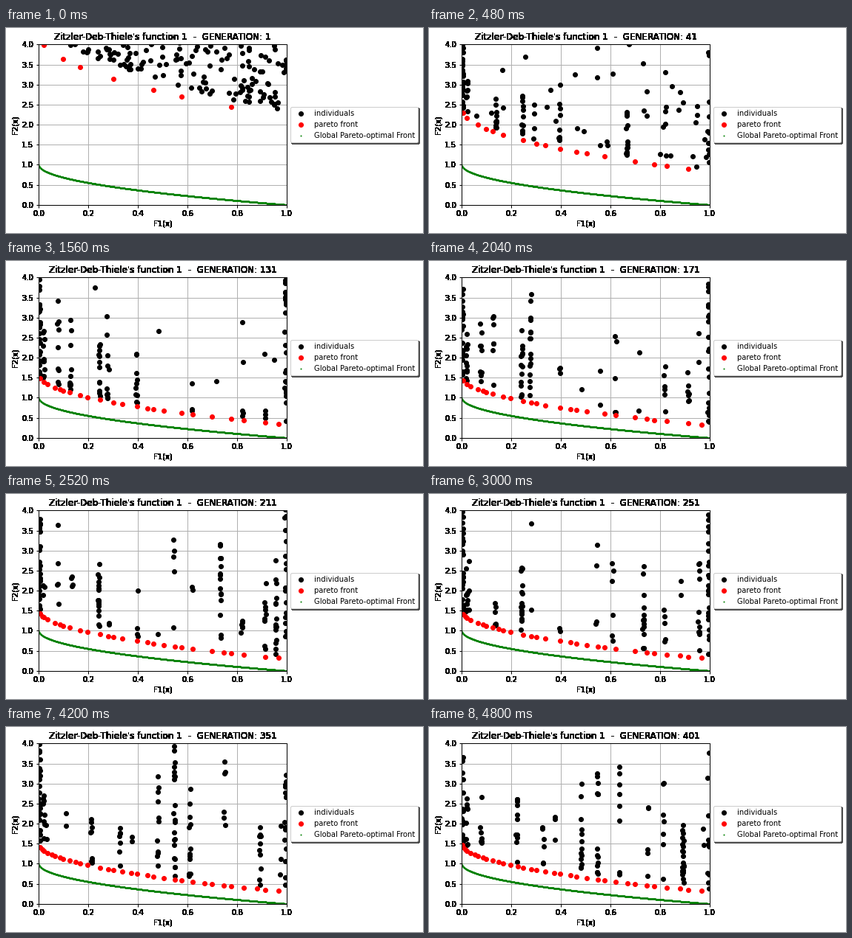
A matplotlib script that plays this animation: 563 px wide and 278 px high, repeating every 4920 ms.

```python
import numpy as np
import matplotlib.pyplot as plt
from matplotlib.animation import FuncAnimation

W, H, DPI = 563, 278, 72
FRAMES, INTERVAL, GEN_STEP = 41, 120, 10
SIZE = 135          # dominated individuals
SLOTS = 12          # places where a gene cluster may settle
LIFE = 12           # frames a cluster lasts


def front(x, age):
    """Best known F2 at x: falls quickly, then settles."""
    top = 1.5 + 2.8 * np.exp(-age / 35)
    drop = 1.2 + .9 * np.exp(-age / 45)
    return top - drop * np.sqrt(x)


def elite(age):
    """Evenly scattered front members, more of them with age."""
    count = round(7 + 27 * (age / 400) ** .45)
    x = (np.arange(1, count + 1) * .618034 % 1) ** 1.6
    return x, front(x, age)


def clusters(i):
    """Columns of equal x: place, weight and reach upwards."""
    cols = [(.003, 22, 1), (.02, 8, .5), (.995, 16, 1)]
    for j in range(SLOTS):
        rng = np.random.default_rng([j, (i + 5 * j) // LIFE])
        u, v, w = rng.random(3)
        cols.append(((j + .3 + .7 * u) / SLOTS, 1 + 16 * v ** 2, .3 + .7 * w))
    return np.array(cols).T


def individuals(i, age):
    """A loose cloud that gathers into columns."""
    rng = np.random.default_rng(i + 7)
    place, weight, reach = clusters(i)
    pick = rng.choice(len(place), SIZE, p=weight / weight.sum())
    loose = rng.random(SIZE) < np.exp(-age / 30)
    x = np.where(loose, rng.random(SIZE) ** .6,
                 place[pick] + rng.uniform(-.003, .003, SIZE))
    low = front(x, age) + .08 + loose * .4 * (1 - x)
    span = (4.05 - low) * np.where(loose, 1, reach[pick])
    return x, low + span * rng.random(SIZE) ** 1.2


def harden(img, dpi):
    """Solid edges without antialiasing."""
    out = img.copy()
    out[..., 3] = img[..., 3] > 0
    return out, 0, 0


plt.rcParams["font.family"] = "DejaVu Sans"
fig = plt.figure(figsize=((W + .001) / DPI, (H + .001) / DPI), dpi=DPI,
                 facecolor="white")
ax = fig.add_axes([44.2 / W, 38.2 / H, 334.8 / W, 217.44 / H])
ax.set(xlim=(0, 1), ylim=(0, 4), xlabel="F1(x)", ylabel="F2(x)",
       xticks=np.arange(6) / 5, yticks=np.arange(9) / 2)
ax.grid(True, color="#b0b0b0", linewidth=1)
ax.tick_params(width=1)
for spine in ax.spines.values():
    spine.set_linewidth(1)

people, = ax.plot([], [], "o", color="black", ms=6, label="individuals")
pareto, = ax.plot([], [], "o", color="red", ms=6, label="pareto front")
x = np.linspace(0, 1, 1000)
ax.plot(x, 1 - np.sqrt(x), "o", color="green", ms=1,
        label="Global Pareto-optimal Front")
ax.legend(loc="center left", bbox_to_anchor=(1, .5),
          shadow={"alpha": 1, "agg_filter": harden})

title = ax.set_title("")
for text in [title, ax.xaxis.label, ax.yaxis.label,
             *ax.get_xticklabels(), *ax.get_yticklabels()]:
    text.set_agg_filter(harden)


def update(i):
    age = GEN_STEP * i
    people.set_data(*individuals(i, age))
    pareto.set_data(*elite(age))
    title.set_text("Zitzler-Deb-Thiele's function 1  -  "
                   f"GENERATION: {age + 1}")
    return people, pareto, title


anim = FuncAnimation(fig, update, frames=FRAMES, interval=INTERVAL,
                     repeat=True, repeat_delay=0, blit=False)
plt.show()
```
